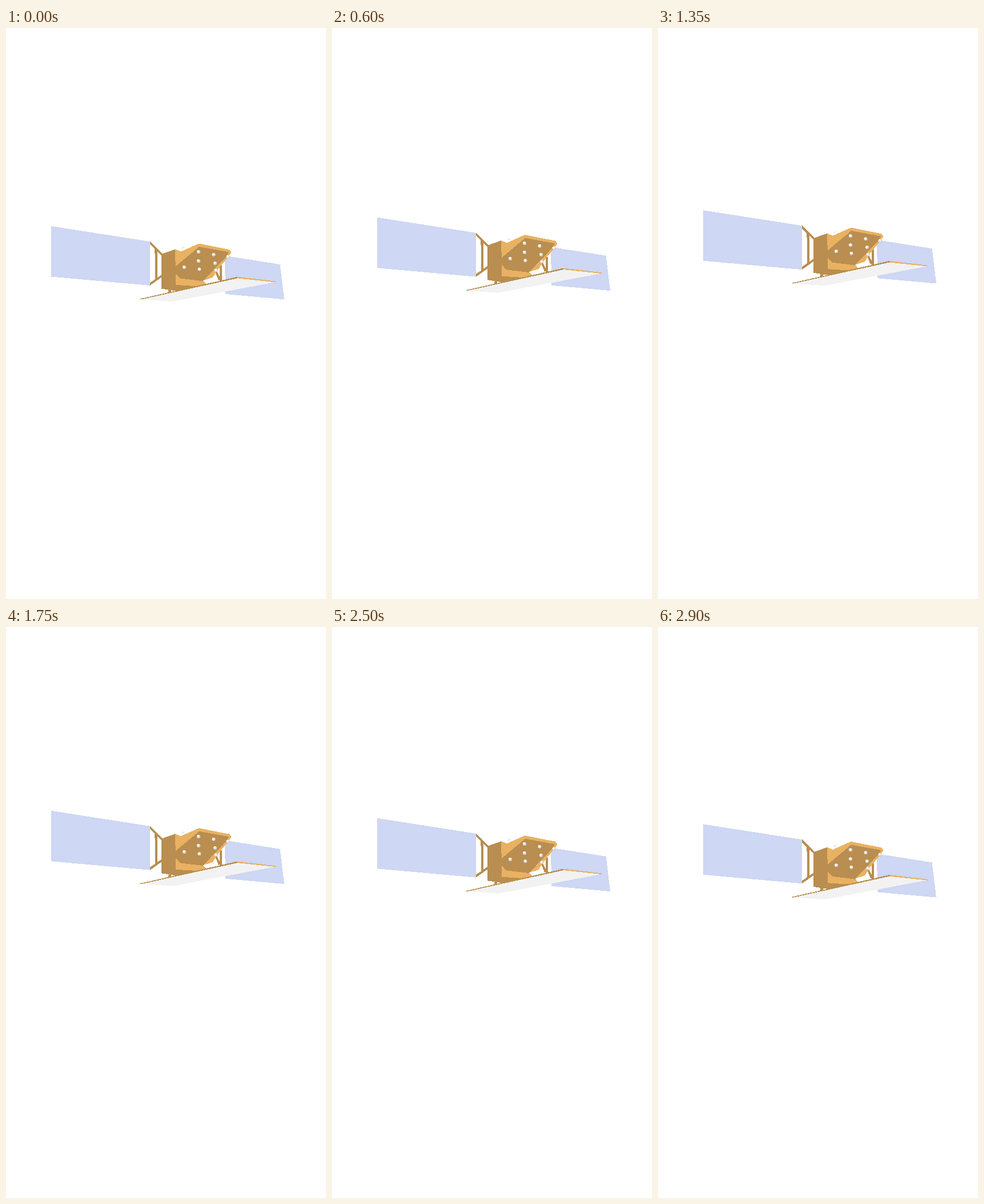
Recreate the animation shown at these times as an HTML page. Size 560 by 1000 pixels, loop 3 s.

```html
<!DOCTYPE html>
<html lang="en">
<head>
<meta charset="utf-8">
<title>Satellite</title>
<style>
  html, body { margin: 0; width: 100%; height: 100%; overflow: hidden; background: #fff; }
  svg { display: block; width: 100%; height: 100%; }
  .panel { fill: #ced7f3; }
  .shade { fill: #b98e50; }
  .gold { fill: #e9b162; }
  .plate { fill: #f2f2f2; }
</style>
</head>
<body>
<svg viewBox="0 0 560 1000" shape-rendering="crispEdges">
  <defs>
    <g id="stud">
      <circle r="3.1" fill="#d5cdc5"/>
      <circle cx="-.6" cy="-.6" r="2.2" fill="#f6f4f2"/>
    </g>
  </defs>
  <g id="craft">
    <!-- solar panels and their struts -->
    <path class="panel" d="M79 347 252 374 252.500 451 79 435.500ZM380 398.300 479.500 414 487 475.300 384 466Z"/>
    <path fill="#fff" d="M376 396 383 398 384 462 378 462Z"/>
    <path class="shade" d="M252 373.500 273 394.500V399.500L252 379ZM252 446 273 431.500V436L252 451Z
      M260.300 385 264.500 389 265.300 441 261.500 443ZM374 412 377.300 409 378.300 443H374.500Z
      M365 425 368 424 376 440 372 442ZM285 457H290L288 465H283Z"/>
    <!-- body -->
    <path fill="#d3dde0" d="M306.500 386 312 383.200 312.500 384.300 308 386.500Z"/>
    <path class="shade" d="M272 396 296 387.500 298 450 347 452V455L300 461 272 456.500Z"/>
    <path class="gold" d="M296 387.500 306 391.500 337.500 377.500 391 388 394.500 393 388 402 369 425 362 437 345 442.500 350 448 346 453 297.500 450Z"/>
    <path class="shade" d="M297 417.500 338 383 390 392.500 386 400 344.500 443.300 305 438.500 297 430Z"/>
    <g id="studs"></g>
    <!-- antenna plate -->
    <path class="plate" d="M235 475 405 437.500 471.500 445 291 479Z"/>
    <path class="shade" d="M234 474.500 405 435.700V438.300L236 475.500Z"/>
    <path class="gold" d="M405 435.700 471.500 443.500V445.300L405 438.300Z"/>
  </g>
</svg>
<script>
const LOOP = 3000, STEP = 50, HALF = LOOP / 2, PHASE = 25;
const craft = document.getElementById("craft");

const studs = [[312, 419], [337, 392], [363.5, 397], [337, 408], [366, 412], [338.5, 422.5], [367.5, 424.5], [388.5, 400.5]];
document.getElementById("studs").innerHTML =
  studs.map(([x, y]) => `<use href="#stud" x="${x}" y="${y}"/>`).join("");

// Height of the hover, with u running from 0 (lowest) to 1 (highest).
const lift = u => u * (52.5 - 41.5 * u + 20 * u * u);
const rest = lift(PHASE / HALF);

function draw(now) {
  // The motion advances in steps and holds the last one a little longer.
  const time = Math.min(Math.floor((now % LOOP) / STEP) * STEP, 2900);
  const u = 1 - Math.abs(time + PHASE - HALF) / HALF;
  craft.setAttribute("transform", `translate(0 ${(rest - lift(u)).toFixed(2)})`);
  requestAnimationFrame(draw);
}
draw(0);
</script>
</body>
</html>
```
